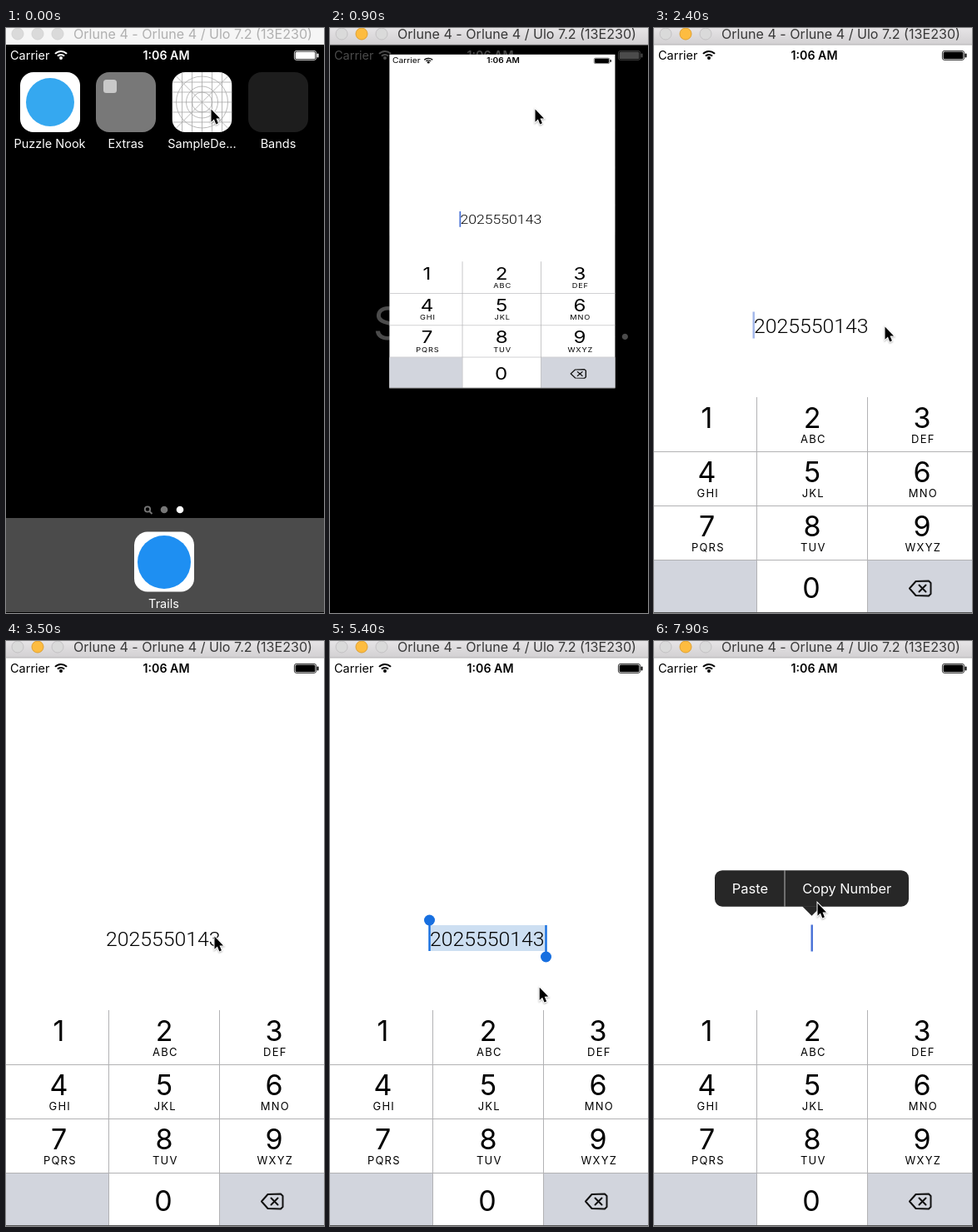
An HTML page with a canvas for the animation above (8000 ms loop, 382 by 702 pixels).

```html
<!DOCTYPE html>
<html lang="en">
<head>
<meta charset="utf-8">
<title>Copy and paste a number</title>
<style>
html, body { margin: 0; width: 100%; height: 100%; overflow: hidden; background: #000; }
canvas { display: block; }
</style>
</head>
<body>
<canvas id="stage" width="382" height="702"></canvas>
<script>
const c = document.getElementById('stage').getContext('2d');
const LOOP = 8000, STEP = 100;
const PHONE = '2025550143';
const SANS = 'px Inter, Roboto, sans-serif';

const clamp = v => Math.max(0, Math.min(1, v));
const ramp = (t, from, to) => clamp((t - from) / (to - from));
const smooth = v => v * v * (3 - 2 * v);

function rect(x, y, w, h, color) {
  c.fillStyle = color;
  c.fillRect(x, y, w, h);
}
function rounded(x, y, w, h, r, color) {
  c.fillStyle = color;
  c.beginPath();
  c.roundRect(x, y, w, h, r);
  c.fill();
}
function circle(x, y, r, fill, stroke) {
  c.beginPath();
  c.arc(x, y, r, 0, 7);
  if (fill) { c.fillStyle = fill; c.fill(); }
  if (stroke) { c.strokeStyle = stroke; c.stroke(); }
}
function shape(points, x = 0, y = 0) {
  c.beginPath();
  points.forEach(([px, py]) => c.lineTo(x + px, y + py));
  c.closePath();
}
function text(str, x, y, size, color, { align = 'center', weight = 400, spacing = 0, family = SANS } = {}) {
  c.font = weight + ' ' + size + family;
  c.textAlign = align;
  c.letterSpacing = spacing + 'px';
  c.fillStyle = color;
  c.fillText(str, x, y);
}
function faded(alpha, draw) {
  if (alpha <= 0) return;
  c.save();
  c.globalAlpha *= alpha;
  draw();
  c.restore();
}

function titleBar(active) {
  const shade = c.createLinearGradient(0, 0, 0, 20);
  shade.addColorStop(0, active ? '#e6e4e6' : '#f6f6f6');
  shade.addColorStop(1, active ? '#d2d0d2' : '#f6f6f6');
  rect(0, 0, 382, 20, shade);
  if (active) rect(0, 19.5, 382, 1, '#b4b2b4');
  c.lineWidth = 1;
  [14, 38, 62].forEach((x, i) => {
    const lit = active && i === 1;
    circle(x, 7, 7, lit ? '#fdbc40' : '#dadada', lit ? '#e0a030' : active ? '#c4c2c4' : '#d4d4d4');
  });
  text('Orlune 4 - Orlune 4 / Ulo 7.2 (13E230)', 81, 13, 16.1, active ? '#383838' : '#b0b0b0', { align: 'left' });
}

function statusBar(color) {
  text('Carrier', 5, 38, 14.5, color, { align: 'left' });
  text('1:06 AM', 192.5, 38, 14.2, color, { weight: 600 });
  c.strokeStyle = color;
  c.lineWidth = 2;
  for (const r of [5.6, 9.6]) {
    c.beginPath();
    c.arc(66, 37.5, r, -Math.PI * 0.76, -Math.PI * 0.24);
    c.stroke();
  }
  circle(66, 36, 2, color);
  c.lineWidth = 0.8;
  c.strokeStyle = color;
  c.beginPath();
  c.roundRect(346.4, 27.4, 26.2, 11, 2.5);
  c.stroke();
  rounded(347.6, 28.6, 23.8, 8.6, 1.5, color);
  rounded(373.5, 30.5, 2, 5, 1, color);
}

function templateIcon(x, y) {
  c.save();
  c.beginPath();
  c.roundRect(x, y, 72, 72, 16);
  c.clip();
  rect(x, y, 72, 72, '#fff');
  c.strokeStyle = '#a8a8a8';
  c.lineWidth = 0.8;
  c.beginPath();
  for (const d of [12, 24, 36, 48, 60]) {
    c.moveTo(x + d, y); c.lineTo(x + d, y + 72);
    c.moveTo(x, y + d); c.lineTo(x + 72, y + d);
  }
  c.moveTo(x, y); c.lineTo(x + 72, y + 72);
  c.moveTo(x + 72, y); c.lineTo(x, y + 72);
  c.stroke();
  for (const r of [12, 19, 31]) circle(x + 36, y + 36, r, null, '#a8a8a8');
  c.restore();
}

function homeScreen(pressed) {
  rounded(17, 53, 72, 72, 16, '#fff');
  circle(53, 89, 29, '#35a8f0');
  rounded(108, 53, 72, 72, 16, '#787878');
  rounded(117, 62, 16, 16, 3.5, '#c9c9c9');
  templateIcon(199.5, 53);
  if (pressed) rounded(199.5, 53, 72, 72, 16, 'rgba(0,0,0,.5)');
  rounded(291, 53, 72, 72, 16, '#1d1d1d');
  ['Puzzle Nook', 'Extras', 'SampleDe...', 'Bands'].forEach((name, i) =>
    text(name, 52.5 + i * 91.5, 144, 14.5, '#fff'));

  c.lineWidth = 1.8;
  circle(170, 577.5, 3.2, null, '#777');
  c.beginPath();
  c.moveTo(172.4, 580);
  c.lineTo(175.5, 583);
  c.stroke();
  circle(190, 578, 4.3, '#777');
  circle(209, 578, 4.3, '#fff');

  rect(0, 588, 382, 113, '#4b4b4b');
  rounded(154, 604.5, 72, 72, 16, '#fff');
  circle(190, 641, 32, '#1e8ff2');
  text('Trails', 189.5, 696, 14.5, '#fff');
}

function keypad(deleting) {
  rect(0, 639, 123, 62, '#d2d5dd');
  rect(257, 639, 125, 62, deleting ? '#fff' : '#d2d5dd');
  for (const x of [123, 256]) rect(x, 443, 1, 258, '#b2b2b4');
  for (const y of [508, 573, 638]) rect(0, y, 382, 1, '#b2b2b4');

  const columns = [63.5, 190, 322];
  ['', 'ABC', 'DEF', 'GHI', 'JKL', 'MNO', 'PQRS', 'TUV', 'WXYZ'].forEach((letters, i) => {
    const x = columns[i % 3], y = 480 + Math.floor(i / 3) * 65;
    text(i + 1, x, y, 34, '#000');
    text(letters, x + 1.3, y + 17.5, 13, '#000', { spacing: 1.2 });
  });
  text('0', 189, 684, 34, '#000');

  c.lineWidth = 2;
  c.lineJoin = c.lineCap = 'round';
  c.strokeStyle = '#111';
  shape([[307, 672.5], [314.5, 664], [330, 663.5], [332.5, 666], [332.5, 679], [330, 681.5], [314.5, 681]]);
  if (deleting) { c.fillStyle = '#111'; c.fill(); }
  c.stroke();
  if (deleting) c.strokeStyle = '#fff';
  c.beginPath();
  c.moveTo(318.5, 668.5); c.lineTo(326.5, 676.5);
  c.moveTo(326.5, 668.5); c.lineTo(318.5, 676.5);
  c.stroke();
  c.lineCap = 'butt';
  c.lineJoin = 'miter';
}

function selection() {
  const blue = '#176fe0';
  rect(119, 341, 141, 31, '#cddff2');
  rect(118.3, 335, 2.4, 37, blue);
  rect(258.3, 341, 2.4, 38, blue);
  circle(119.5, 335, 6.5, blue);
  circle(259.5, 379, 6.5, blue);
}

function editMenu(x, y, copying) {
  rounded(x, y, 233, 43.5, 9, '#272727');
  if (copying) rounded(x + 84, y, 149, 43.5, [0, 9, 9, 0], '#5c5c5c');
  shape([[178, 43], [201, 43], [189.5, 54.5]], 0, y);
  c.fillStyle = '#272727';
  c.fill();
  rect(x + 83.5, y, 1, 43.5, '#b8b8b8');
  text('Paste', x + 42.5, y + 27.7, 16.5, '#fff');
  text('Copy Number', x + 158.7, y + 27.7, 16.3, '#fff');
}

const SELECT = 3600, ERASE = 6300;

function caretAlpha(t) {
  if (t < 1300 || t >= 7100) return 1;
  const p = t < SELECT ? t % 1000 : (t - ERASE) % 1000 - 200;
  return p < 500 ? 1 - ramp(p, 300, 500) : ramp(p, 700, 950);
}

function appScreen(t) {
  rect(0, 20, 382, 682, '#fff');
  statusBar('#000');
  const selected = t >= SELECT && t < ERASE;
  if (selected) selection();
  if (t < ERASE) text(PHONE, 120, 366, 24.8, '#000', { align: 'left', weight: 300, family: 'px Roboto, sans-serif' });
  if (!selected) {
    faded(caretAlpha(t), () => rect(t < SELECT ? 118.5 : 188.5, 340.5, 2.4, 32, '#456fd6'));
  }
  keypad(t >= 6200 && t < 6400);
  rect(0, 701, 382, 1, '#555');
  faded(ramp(t, 3500, 3800) - ramp(t, 5000, 5300), () => editMenu(72, 276.5, t >= 4500 && t < 4800));
  faded(ramp(t, 7300, 7600), () => editMenu(73, 275.2));
}

// Pointer stops: time, x, y
const stops = [
  [0, 246, 97], [1300, 246, 97], [2100, 313, 370], [2200, 313, 370], [2400, 277, 358],
  [2600, 277, 358], [3100, 250, 354], [3700, 250, 354], [4300, 224, 300], [5100, 224, 300],
  [5900, 310, 664], [6200, 310, 664], [6500, 300, 628], [7000, 192, 344], [7700, 192, 344],
  [7900, 196, 314], [LOOP, 196, 314]
];
function pointer(t) {
  const i = stops.findIndex(s => s[0] > t);
  const [t0, x0, y0] = stops[i - 1], [t1, x1, y1] = stops[i];
  const k = smooth(ramp(t, t0, t1));
  c.save();
  c.shadowColor = 'rgba(0,0,0,.3)';
  c.shadowBlur = 2;
  c.shadowOffsetY = 1;
  shape([[0.5, 0.5], [0.5, 15.8], [3.9, 12.6], [6.3, 18.4], [8.9, 17.3], [6.5, 11.6], [11, 11.4]],
    x0 + (x1 - x0) * k, y0 + (y1 - y0) * k);
  c.lineWidth = 2;
  c.strokeStyle = '#fff';
  c.stroke();
  c.restore();
  c.fillStyle = '#000';
  c.fill();
}

function draw(t) {
  // The launched icon grows into the app while the home screen zooms with it;
  // the height follows the width a little later
  const open = smooth(ramp(t, 580, 1117));
  const unfold = smooth(ramp(t, 634, 1140));
  const x = 199.5 * (1 - open), y = 53 - 33 * open;
  const w = 72 + 310 * open, h = 72 + 610 * unfold;
  rect(0, 0, 382, 702, '#000');
  if (open < 1) {
    faded(1 - 1.1 * open, () => {
      statusBar('#fff');
      const zoom = w / 72;
      c.translate(x, y);
      c.scale(zoom, zoom);
      c.translate(-199.5, -53);
      homeScreen(t >= 400);
    });
  }
  faded(clamp(open * 3), () => {
    c.translate(x, y);
    c.scale(w / 382, h / 682);
    c.translate(0, -20);
    appScreen(t);
  });
  titleBar(t >= 400);
  pointer(t);
}

function tick() {
  draw(Math.floor(performance.now() % LOOP / STEP) * STEP);
  requestAnimationFrame(tick);
}
tick();
</script>
</body>
</html>
```
